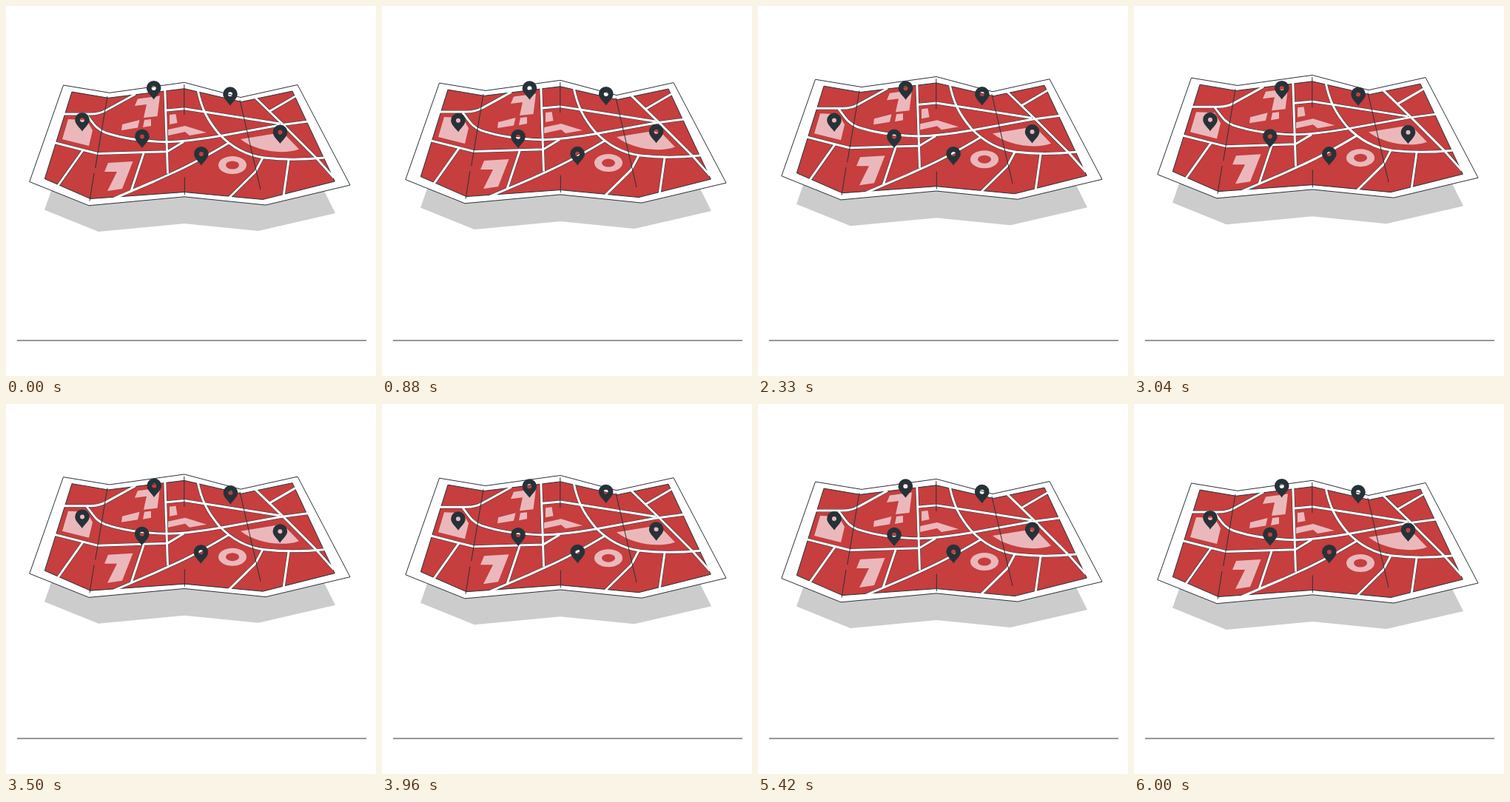
Recreate the animation shown at these times as an HTML page. Size 500x500 px, loop 6040 ms.

```html
<!DOCTYPE html>
<html lang="en">
<head>
<meta charset="utf-8">
<title>Floating map</title>
<style>
  html, body { margin: 0; width: 100%; height: 100%; overflow: hidden; background: #fff; }
  svg { display: block; width: 100%; height: 100%; }
  .line { fill: none; stroke: #263238; }
  .road { fill: none; stroke-linejoin: round; }
</style>
</head>
<body>
<svg viewBox="0 0 500 500">
  <defs>
    <path id="land" d="M89 116L138 124.3L241 111.7L318 129.5L387 115L444.3 237L347 261.5L241 251.5L114 260.5L52.3 233.5Z"/>
    <clipPath id="inside"><use href="#land"/></clipPath>
    <g id="roads">
      <path d="M78 146H112C124 146.5 130 144 136 140.5L175 119"/>
      <path d="M109 147C118 158 121 166 134 171C160 180 190 183 217 183.7C245 183 270 179 290 175.5L370 161L408 156"/>
      <path d="M66 184.8L104 194.5L124 199.5L218 196.7L240 183.5"/>
      <path d="M104 195L70 243"/>
      <path d="M214.8 113L218.5 226.5"/>
      <path d="M217 141L241 138.8L268 143L370 159"/>
      <path d="M259 113C264 138 272 154 288 173C306 192 326 202 349 205C375 208 400 208 430 205"/>
      <path d="M337 124L371 157L419 205L443 232"/>
      <path d="M391 122L355 143"/>
      <path d="M146 260L200 237L222 227Q256 212 302 184.5"/>
      <path d="M186 199L169 250"/>
      <path d="M347 205L337 224L301 259.5"/>
      <path d="M382 208L375 257"/>
    </g>
    <path id="pin" fill="#263238" fill-rule="evenodd"
      d="M0 15.5C-3 10.5 -9.8 6 -9.8 -.2A9.8 9.8 0 0 1 9.8 -.2C9.8 6 3 10.5 0 15.5ZM-3 0A3 3 0 0 0 3 0A3 3 0 0 0 -3 0Z"/>
  </defs>

  <path class="line" d="M15 452H487"/>

  <g id="map">
    <path fill="#ccc" d="M62 247L52 275.5L125 305L241 294L341 304L445 280L429 248Z"/>
    <path fill="#fff" stroke="#263238" d="M77.5 107L140 117.3L241 103.3L317 123.5L394 106.5L465 242L351 269L241 257.8L112 269.7L31.8 237.5Z"/>
    <use href="#land" fill="#c63e3e" stroke="#263238"/>
    <g fill="#eab8bb">
      <path d="M84 153L109 154L117 168L112 189L76 180Z"/>
      <path d="M178 125.5L208 121.5L204.5 149L186 151L190 133L174 135Z"/>
      <path d="M157 160L180.5 154L178 164.5L156 168Z"/>
      <path d="M187 154L196 153L196 162L185 164Z"/>
      <path d="M221 147L229.5 146L231.5 158L221 160Z"/>
      <path d="M219 167L242 162L271 171L248 175L242 170L219 175Z"/>
      <path d="M138 212L171.5 210L157 247L137 250L150 224L133 224Z"/>
      <path d="M317 180L366 172L379 176L396 193.5C372 202 336 195 317 180Z"/>
      <ellipse cx="306" cy="215" rx="19" ry="12"/>
    </g>
    <ellipse cx="306" cy="215" rx="9" ry="5.5" fill="#c63e3e"/>
    <g clip-path="url(#inside)">
      <use href="#roads" class="road" stroke="#263238" stroke-width="4"/>
    </g>
    <use href="#roads" class="road" stroke="#fff" stroke-width="3"/>
    <path class="line" d="M137 122L120.7 219M119 226L113 263.5M240.8 106V147M241.3 231.5V255M316 127L344 248"/>
  </g>

  <g id="pins">
    <use href="#pin" x="199.7" y="111"/>
    <use href="#pin" x="303" y="119.3"/>
    <use href="#pin" x="103" y="154"/>
    <use href="#pin" x="183.9" y="176.4"/>
    <use href="#pin" x="263.9" y="200"/>
    <use href="#pin" x="370.5" y="170.6"/>
  </g>
</svg>
<script>
  const LOOP = 6040, FLOAT = 6000, SWAY = 1500;
  const map = document.getElementById('map');
  const pins = document.getElementById('pins');

  // Linear wave: 0, 1, 0, -1, 0 over one period.
  function wave(p) {
    return 1 - Math.abs(((p + 0.75) % 1) * 4 - 2) === 0 ? 0 : Math.abs(((p + 0.25) % 1) * 4 - 2) * -1 + 1;
  }

  function draw(now) {
    const t = Math.min(now % LOOP, FLOAT);
    const lift = 10 * (1 - Math.abs(2 * t / FLOAT - 1));
    map.setAttribute('transform', `translate(0 ${-lift})`);
    pins.setAttribute('transform', `rotate(${wave(t / SWAY)} 237 158.5)`);
    requestAnimationFrame(() => draw(performance.now()));
  }
  draw(performance.now());
</script>
</body>
</html>
```
